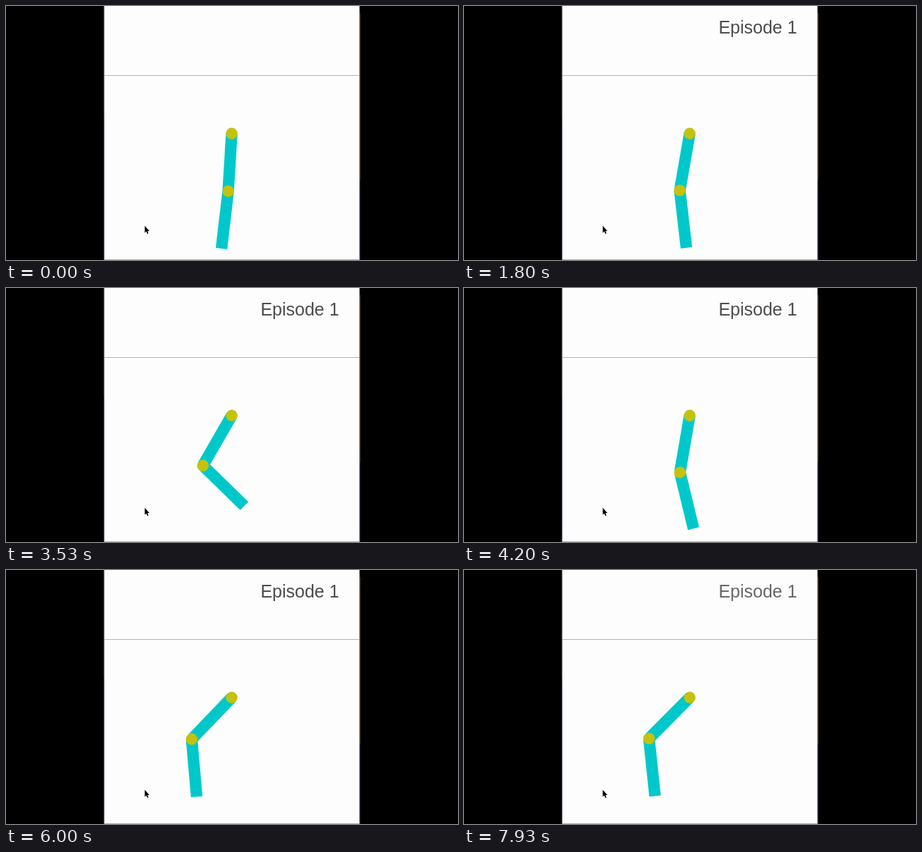
An HTML page with a canvas that plays this animation: 640x360 px, repeating every 8000 ms.

```html
<!DOCTYPE html>
<html lang="en">
<head>
<meta charset="utf-8">
<title>Two-link pendulum</title>
<style>
  html, body { margin: 0; width: 100%; height: 100%; overflow: hidden; background: #000; }
  canvas { display: block; width: 640px; height: 360px; }
</style>
</head>
<body>
<canvas id="stage" width="640" height="360"></canvas>
<script>
const ctx = document.getElementById('stage').getContext('2d');

const LOOP = 8000;
const STEPS = 120;
const LINK = 81.9;
const HALF = 8.2;
const PIVOT = { x: 319.6, y: 180.7 };

// The pendulum swings in two modes: in the fast one the lower link folds
// against the upper, in the slow one it follows. Ratios are bend to upper angle.
const FAST = -1.79;
const SLOW = 2.83;

// Key poses: time in ms, then the tilt of the upper and the lower link in degrees.
const poses = [
  [0, -3.5, -6.65],
  [1000, 13.4, 10.6],
  [2530, -28.1, 1.5],
  [3530, -29.9, 45.7],
  [4870, 50.5, -50.2],
  [6000, -43.8, 5],
  [7930, -44.75, 6]
];

// Half swings take longer once the swing is wide.
const WIDE_AT = 2630;
function phase(t) {
  const halfSwing = t < WIDE_AT ? 347.6 : 438.8;
  return Math.PI * (7 + (t - WIDE_AT) / halfSwing);
}

// Each pose fixes the size of the fast swing and the slow lean at its time.
const keys = poses.map(([t, upper, lower]) => {
  const fast = (SLOW * upper - (lower - upper)) / (SLOW - FAST);
  return { t, size: fast / Math.cos(phase(t)), lean: upper - fast };
});

function ease(name, t) {
  const i = Math.max(1, keys.findIndex(key => key.t >= t));
  const a = keys[i - 1];
  const b = keys[i];
  const u = (t - a.t) / (b.t - a.t);
  return a[name] + (b[name] - a[name]) * (1 - Math.cos(Math.PI * u)) / 2;
}

function rect(color, x, y, w, h) {
  ctx.fillStyle = color;
  ctx.fillRect(x, y, w, h);
}

function drawWindow() {
  rect('#000', 0, 0, 640, 360);
  rect('#4a4038', 138, 0, 1, 152);
  rect('#27344e', 138, 152, 1, 208);
  rect('#fdfdfd', 139, 0, 361, 360);
  rect('#d0d0d0', 139, 0, 1, 360);
  rect('#8c8a88', 500, 0, 1, 360);
  rect('#4a3c2e', 501, 10, 1, 236);
  rect('#1c2434', 501, 246, 1, 114);
  rect('#b4b4b4', 139, 98, 361, 1);
  rect('#acacac', 139, 359, 361, 1);
}

function drawTitle(t) {
  const alpha = Math.max(0, Math.min(1, t / 900, (LOOP + 780 - t) / 1000));
  ctx.font = '25px "Liberation Sans", Arial, sans-serif';
  ctx.fillStyle = `rgba(76, 76, 76, ${alpha})`;
  ctx.fillText('Episode 1', 360.4, 38.7);
}

// Draws a link with its upper joint and returns the lower end.
function drawLink(from, degrees) {
  const angle = degrees * Math.PI / 180;
  ctx.save();
  ctx.translate(from.x, from.y);
  ctx.rotate(-angle);
  rect('#00c8ca', -HALF, 0, HALF * 2, LINK);
  ctx.restore();
  ctx.fillStyle = '#c4c20e';
  ctx.beginPath();
  ctx.arc(from.x, from.y, HALF, 0, Math.PI * 2);
  ctx.fill();
  return { x: from.x + LINK * Math.sin(angle), y: from.y + LINK * Math.cos(angle) };
}

function drawCursor() {
  ctx.fillStyle = '#000';
  ctx.fill(new Path2D('M196.5 311.6 v10 l2.1 -2 l1.6 3.4 l1.5 -.7 l-1.5 -3.4 h2.8 z'));
}

function draw(t) {
  const fast = ease('size', t) * Math.cos(phase(t));
  const lean = ease('lean', t);
  const upper = fast + lean;
  const lower = upper + FAST * fast + SLOW * lean;
  drawWindow();
  drawTitle(t);
  drawLink(drawLink(PIVOT, upper), lower);
  drawCursor();
}

// Poses advance fifteen times a second, on a 10 ms grid.
function frame() {
  const t = performance.now() % LOOP;
  const step = Math.floor((t + 4) * STEPS / LOOP) % STEPS;
  draw(Math.round(step * LOOP / STEPS / 10) * 10);
  requestAnimationFrame(frame);
}
frame();
</script>
</body>
</html>
```
